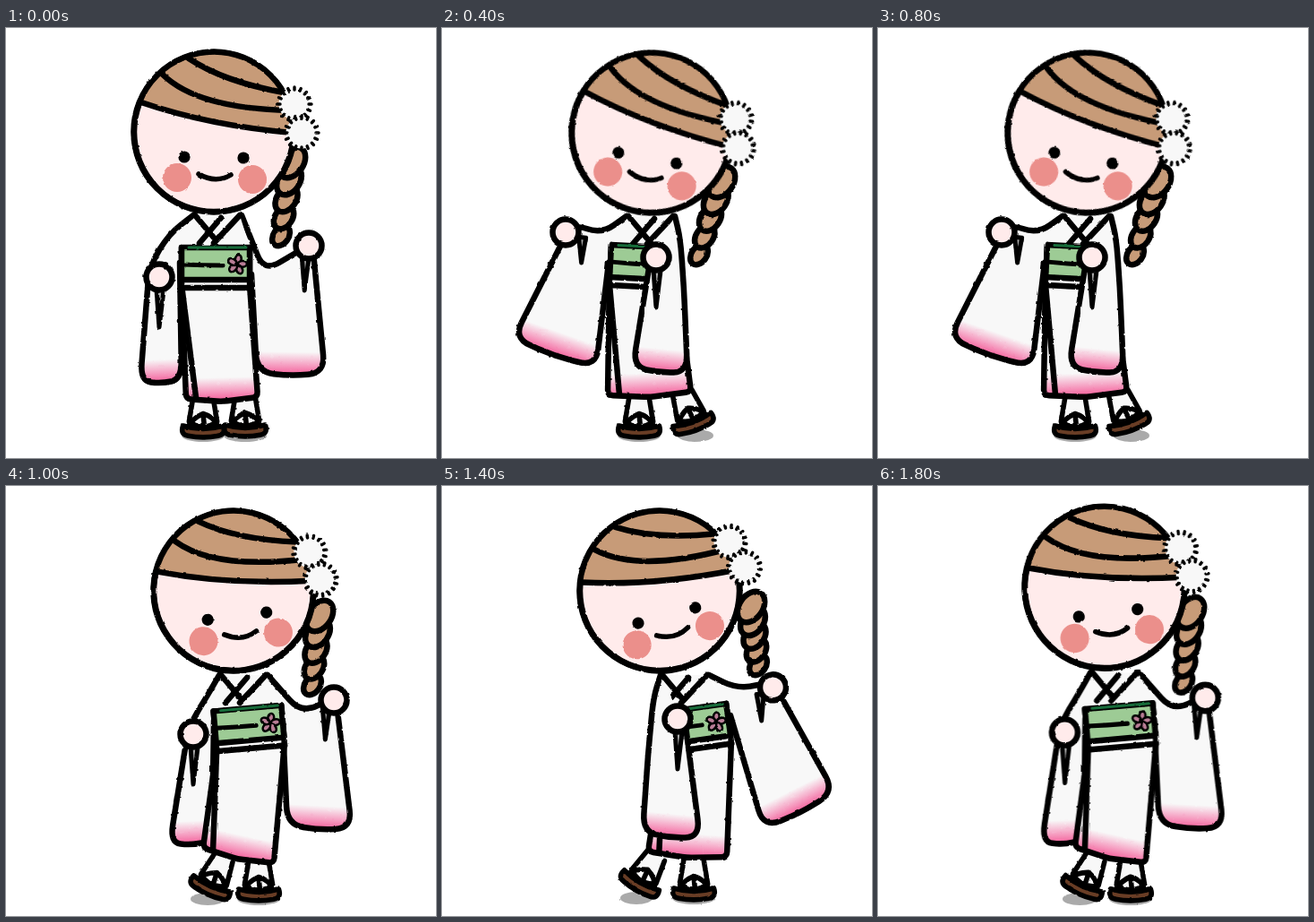
An HTML page that plays this animation: 480 px wide and 480 px high, repeating every 2 s.

```html
<!DOCTYPE html>
<html lang="en">
<head>
<meta charset="utf-8">
<title>Kimono dance</title>
<style>
html, body { margin: 0; width: 100%; height: 100%; overflow: hidden; background: #fff; }
svg { display: block; width: 100%; height: 100%; }
</style>
</head>
<body>
<svg viewBox="0 0 480 480" fill="none" stroke="#000" stroke-width="6.5" stroke-linecap="round" stroke-linejoin="round">
  <defs>
    <filter id="rough" filterUnits="userSpaceOnUse" x="0" y="0" width="480" height="480" color-interpolation-filters="sRGB">
      <feTurbulence type="fractalNoise" baseFrequency=".2" seed="4"/>
      <feDisplacementMap in="SourceGraphic" scale="2.5" xChannelSelector="R" yChannelSelector="G"/>
    </filter>
    <clipPath id="face"><circle r="89"/></clipPath>
  </defs>
  <g id="doll" filter="url(#rough)"></g>
</svg>
<script>
const WHITE = '#f8f8f8', PINK = '#f468a0', SKIN = '#ffebeb', HAIR = '#c79b78', CHEEK = '#eb8f8b';
const doll = document.getElementById('doll');

// head, feet, obi: x, y, angle. Sleeve edge: elbow, cuff, two hem corners, armpit.
const stand = {
  head: [232, 116, 0], neck: [236, 209], obi: [234, 263, 0],
  braid: [[319, 150], [307, 232]], hem: [[201, 414], [281, 412]],
  feet: [[220, 444, 0], [267, 443, 0]],
  left: { hand: [171, 278], edge: [[182, 230], [160, 266], [150, 394], [196, 392], [194, 262]] },
  right: { hand: [338, 243], edge: [[288, 272], [342, 240], [356, 385], [280, 384], [274, 275]] }
};
const swayLeft = {
  head: [234, 117, 9.5], neck: [233, 210], obi: [226, 262, 3],
  braid: [[312, 172], [287, 253]], hem: [[185, 410], [278, 406]],
  feet: [[220, 444, 0], [279, 437, -20]],
  left: { hand: [138, 228], edge: [[178, 230], [145, 218], [80, 346], [172, 378], [186, 262]] },
  right: { hand: [239, 256], edge: [[266, 235], [270, 290], [274, 384], [213, 378], [232, 262]], front: true }
};
const openArms = {
  head: [254, 117, -8], neck: [265, 211], obi: [271, 266, -5],
  braid: [[350, 145], [342, 222]], hem: [[220, 404], [299, 421]],
  feet: [[230, 444, 24], [282, 450, 0]],
  left: { hand: [209, 277], edge: [[226, 232], [204, 268], [183, 398], [230, 396], [232, 262]] },
  right: { hand: [366, 239], edge: [[330, 254], [368, 235], [386, 382], [314, 378], [310, 290]] }
};
const swayRight = {
  head: [245, 118, -14], neck: [271, 211], obi: [282, 266, -8],
  braid: [[345, 135], [353, 200]], hem: [[230, 408], [318, 414]],
  feet: [[223, 440, 30], [281, 449, 0]],
  left: { hand: [263, 260], edge: [[236, 236], [230, 300], [224, 386], [288, 392], [272, 268]], front: true },
  right: { hand: [368, 231], edge: [[330, 230], [368, 224], [426, 353], [344, 386], [318, 258]] }
};

const lerp = (a, b, k) => a + (b - a) * k;
const between = (a, b, k) => a.map((v, i) => lerp(v, b[i], k));

function mix(a, b, k = .5) {
  if (typeof a === 'number') return lerp(a, b, k);
  if (Array.isArray(a)) return a.map((v, i) => mix(v, b[i], k));
  return Object.fromEntries(Object.keys(a).map(key => [key, mix(a[key], b[key], k)]));
}

const stepLeft = {
  ...mix(stand, swayLeft), head: [233, 115, 5],
  right: { hand: [293, 271], edge: [[292, 250], [306, 285], [316, 396], [270, 394], [272, 270]] }
};

// rise: lean and stretch measured from the ground
const steps = [
  stand, stepLeft, swayLeft,
  { ...swayLeft, head: [233, 116, 11], left: { ...swayLeft.left, turn: 3.5 } },
  swayLeft, openArms, swayRight,
  { ...swayRight, head: [243, 117, -16], right: { ...swayRight.right, turn: -5 } },
  { ...swayRight, rise: [.006, .007] },
  { ...openArms, rise: [-.003, .011] }
];

const path = (d, attr = '') => `<path d="${d}" ${attr}/>`;
const dot = (x, y, r, fill, attr = 'stroke="none"') => `<circle cx="${x}" cy="${y}" r="${r}" fill="${fill}" ${attr}/>`;
const place = ([x, y, r = 0], inner) => `<g transform="translate(${x} ${y}) rotate(${r})">${inner}</g>`;
const ring = (n, part) => Array.from({ length: n }, (_, i) => part(i * 360 / n)).join('');

// Polyline with rounded corners
function soft(p, r) {
  let d = 'M' + p[0];
  for (let i = 1; i < p.length - 1; i++) {
    const cut = q => between(p[i], q, Math.min(.5, r / Math.hypot(q[0] - p[i][0], q[1] - p[i][1])));
    d += `L${cut(p[i - 1])}Q${p[i]} ${cut(p[i + 1])}`;
  }
  return d + 'L' + p[p.length - 1];
}

// Pink fade square to the hem line a-b, and the low point of its bulge
function hemline(id, a, b) {
  const len = Math.hypot(b[0] - a[0], b[1] - a[1]), s = Math.sign(b[0] - a[0]) / len;
  const off = d => between(a, b, .5).map((v, i) => v + d * s * (i ? b[0] - a[0] : a[1] - b[1]));
  const [x1, y1] = off(-23), [x2, y2] = off(1);
  return {
    low: off(4),
    fade: `<linearGradient id="${id}" gradientUnits="userSpaceOnUse" x1="${x1}" y1="${y1}" x2="${x2}" y2="${y2}">
      <stop stop-color="${WHITE}"/><stop offset="1" stop-color="${PINK}"/></linearGradient>`
  };
}

const foot = f => place(f, '<g transform="scale(1.12)">' +
  path('M-10-28L-14-4Q0 6 14-4L10-28', `fill="${WHITE}" stroke-width="5"`) +
  path('M-20 0Q-23 9-15 10Q0 13 15 10Q23 9 20 0Q0 6-20 0Z', 'fill="#693d25" stroke-width="5"') +
  path('M-15 1Q-10-8 0-12Q11-9 15 1M0-12L1-2', 'stroke-width="5"') + '</g>');

const pompom = (x, y) => place([x, y], dot(0, 0, 17.5, WHITE) +
  ring(16, a => path('M16 0H19', `stroke-width="3.4" transform="rotate(${a})"`)));

function head(at) {
  const fringe = 'M-81-33Q-5-7 88 1';
  return place(at,
    `<circle r="89" fill="${SKIN}"/><g clip-path="url(#face)">` +
    path(fringe + 'V-100H-100Z', `fill="${HAIR}" stroke="none"`) +
    path(fringe + 'M-57-64Q-18-26 85-24M-28-82Q11-56 78-44') + '</g><circle r="89.5"/>' +
    dot(-41, 51, 16, CHEEK) + dot(43, 53, 16, CHEEK) +
    dot(-33, 28, 6.6, '#000') + dot(33, 29, 6.6, '#000') +
    path('M-17 47Q2 58 19 48', 'stroke-width="5.5"') +
    pompom(90, -31) + pompom(98, 1));
}

// Twisted lobes that shrink toward the tip
function braid([root, tip]) {
  let s = '';
  for (let i = 4; i >= 0; i--) {
    const k = i / 4, [x, y] = between(root, tip, k), size = 1 - .35 * k;
    s += place([x, y, -55], `<ellipse rx="${19 * size}" ry="${13 * size}" fill="${HAIR}"/>`);
  }
  return s;
}

function sleeve(pose, side) {
  const { hand: [hx, hy], edge, turn = 0 } = pose[side], [nx, ny] = pose.neck;
  const out = side === 'left' ? -1 : 1, shoulder = [nx + 27 * out, ny];
  const [elbow, cuff, a, b, pit] = edge, { low, fade } = hemline(side, a, b);
  const lift = Math.max(0, ny + 40 - hy);
  return `<g transform="rotate(${turn} ${shoulder})">` + fade +
    path(soft([shoulder, elbow, cuff, a, low, b, pit], 20), `fill="url(#${side})"`) +
    path(`M${hx - 3 - lift * .8 * out} ${hy + 14 - lift * .4}l3 ${42 - lift * .6}l5 ${lift * .6 - 41}z`, 'fill="#aaa" stroke-width="5"') +
    dot(hx, hy, 14.5, SKIN, '') + '</g>';
}

const bloom = place([24, 1], ring(5, a =>
  `<ellipse cy="-6" rx="3.4" ry="5" transform="rotate(${a + 12})" fill="#b97d96" stroke-width="2.6"/>`));

function robe({ neck, obi, hem: [a, b] }) {
  const [x, y, turn] = obi, t = turn * Math.PI / 180, c = Math.cos(t), s = Math.sin(t);
  const on = (u, v) => [x + u * c - v * s, y + u * s + v * c];
  const top = [on(-38, -18), on(38, -18)], base = [on(-38, 24), on(38, 24)];
  const { low, fade } = hemline('skirt', a, b), [nx, ny] = neck;
  return fade +
    path(`M${nx - 25} ${ny}H${nx + 25}L${top[1]}L${top[0]}Z`, `fill="${WHITE}" stroke="none"`) +
    path(soft([top[0], base[0], a, low, b, base[1], top[1]], 6), 'fill="url(#skirt)"') +
    path(`M${base[0]}L${between(a, b, .14)}`) +
    place(neck, path('M-25 0L-4 25M4 3L-20 31M25 0L-4 31')) +
    place(obi, path('M-38-18H38V18H-38Z', 'fill="#9dcb95"') +
      path('M-30-18H34', 'stroke="#176c3a" stroke-width="3"') +
      path('M-36 1Q-15 2 8 2', 'stroke-width="5"') + path('M-36 27H38') + bloom);
}

function draw(p) {
  const [lean, grow] = p.rise || [0, 0];
  const ground = 11 + Math.max(...p.feet.map(f => f[1]));
  const shade = ([x, , r]) => `<ellipse cx="${x - r * .2}" cy="${ground}" rx="${24 - Math.abs(r) * .2}" ry="7" fill="#aaa" stroke="none"/>`;
  const sleeves = front => ['left', 'right'].filter(s => !!p[s].front === front).map(s => sleeve(p, s)).join('');
  doll.innerHTML = `<g transform="matrix(1 0 ${-lean} ${1 + grow} ${465 * lean} ${-465 * grow})">` +
    p.feet.map(shade).join('') + p.feet.map(foot).join('') + braid(p.braid) +
    sleeves(false) + robe(p) + sleeves(true) + head(p.head) + '</g>';
}

let shown = -1;
function tick(now) {
  const i = Math.floor(now % 2000 / 200);
  if (i !== shown) draw(steps[shown = i]);
  requestAnimationFrame(tick);
}
tick(performance.now());
</script>
</body>
</html>
```
